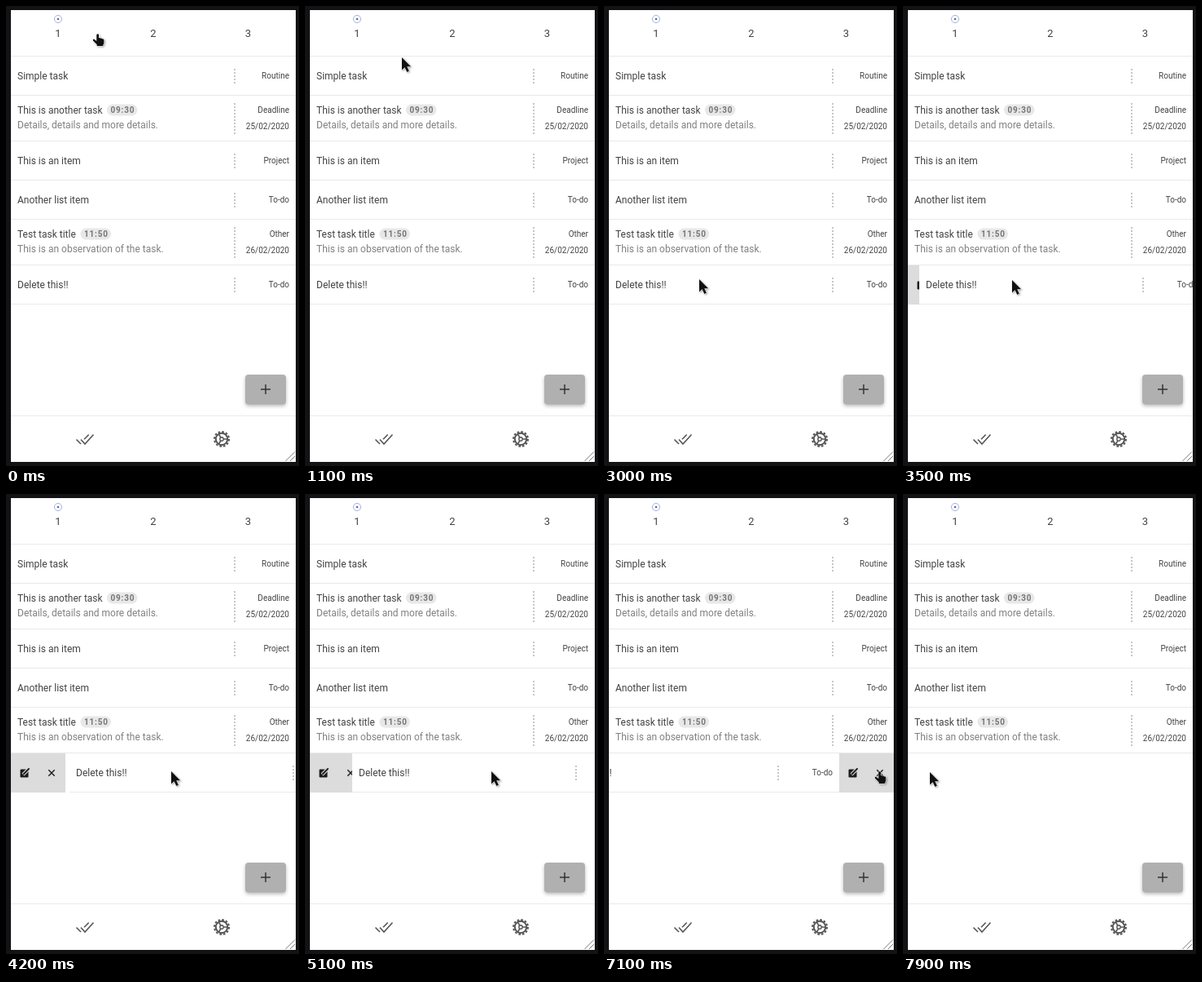
Recreate the animation shown at these times as an HTML page. Size 360x564 px, loop 8 s.

```html
<!DOCTYPE html>
<html lang="en">
<head>
<meta charset="utf-8">
<title>Task list</title>
<style>
html, body { margin: 0; width: 100%; height: 100%; overflow: hidden; background: #131215; }
svg { display: block; width: 360px; height: 564px; }
text { font: 12px Roboto, sans-serif; fill: #434343; }
.tab { font-size: 13px; text-anchor: middle; }
.detail { fill: #808080; }
.side { font-size: 10px; text-anchor: end; }
.time { font-size: 10px; font-weight: 700; letter-spacing: .8px; fill: #757575; }
.pill { fill: #e8e8e8; }
.rule { fill: #e9e9e9; }
.dots { stroke: #c6c6c6; stroke-width: 2; stroke-dasharray: 2 2; }
.icon { fill: none; stroke: #555; stroke-width: 1.6; }
.pointer { fill: #111; stroke: #fff; stroke-width: 1; paint-order: stroke; filter: drop-shadow(1px 1px 1px rgba(0,0,0,.35)); }
.fab { fill: #b0b0b0; filter: drop-shadow(0 2px 2px rgba(0,0,0,.28)); }
</style>
</head>
<body>
<svg viewBox="0 0 360 564">
  <defs>
    <clipPath id="page"><rect x="6" y="5" width="350" height="554"/></clipPath>
    <g id="actions">
      <rect width="67" height="48" fill="#dcdcdc"/>
      <rect x="11.5" y="19.5" width="10" height="10" rx="1.2" fill="#1c1c1c"/>
      <path d="M15 26L23 18" stroke="#dcdcdc" stroke-width="4"/>
      <path d="M15.3 25.7L22.6 18.4" stroke="#1c1c1c" stroke-width="2"/>
      <path d="M46.3 20.3l7.4 7.4m0-7.4l-7.4 7.4" stroke="#222" stroke-width="1.5"/>
    </g>
  </defs>
  <rect x="6" y="5" width="350" height="554" fill="#fff"/>
  <circle cx="64" cy="16" r="4.6" fill="#fff" stroke="#a9b2d8"/>
  <circle cx="64" cy="16" r="1.3" fill="#5068bd"/>
  <text class="tab" x="64" y="38">1</text>
  <text class="tab" x="181" y="38">2</text>
  <text class="tab" x="297.5" y="38">3</text>
  <rect class="rule" x="6" y="61" width="350" height="1"/>
  <g id="list" clip-path="url(#page)"></g>

  <rect class="fab" x="294" y="452" width="50" height="36.5" rx="4"/>
  <path d="M313 470h12m-6-6v12" stroke="#333" stroke-width="1.5"/>

  <rect class="rule" x="6" y="502" width="350" height="1"/>
  <path class="icon" d="M86.5 531.5l5.5 5.5M92 531.5l5 5.5 10.5-11.5M96 531.3l5.7-5.8"/>
  <g class="icon" transform="translate(265 531)">
    <circle r="9" stroke-width="2" stroke-dasharray="2.6 2.112"/>
    <circle r="7.2" stroke-width="2"/>
    <circle r="2.2" stroke-width="1.4"/>
    <path d="M2.2 0H7M-1.1-1.9L-3.5-6M-1.1 1.9L-3.5 6"/>
  </g>
  <path d="M343.5 558L355 546.5M349 558l6-6" stroke="#777"/>

  <g id="cursor">
    <path id="arrow" class="pointer" d="M0 0V15.5L3.6 12.2 6.3 18 8.9 16.8 6.3 11.2H11.2Z"/>
    <path id="hand" class="pointer" d="M-.7 0Q.7-1.4 2 0V4.2Q3.2 3.5 4.2 4.8 5.7 4 6.3 5.4 8.2 4.8 8.4 6.8V10Q8.2 11.5 7.3 12.6V14H-.3V12.3L-5 7.6Q-5.8 5.8-4 5.6L-.7 7.9Z"/>
  </g>
</svg>
<script>
const LOOP = 8000, STEP = 100, REMOVED = 7400;
const $ = id => document.getElementById(id);

const rows = [
  { y: 62, title: 'Simple task', kind: 'Routine' },
  { y: 110, title: 'This is another task', kind: 'Deadline', time: '09:30', pillX: 124,
    detail: 'Details, details and more details.', date: '25/02/2020' },
  { y: 166, title: 'This is an item', kind: 'Project' },
  { y: 214, title: 'Another list item', kind: 'To-do' },
  { y: 262, title: 'Test task title', kind: 'Other', time: '11:50', pillX: 91.5,
    detail: 'This is an observation of the task.', date: '26/02/2020' },
  { y: 318, title: 'Delete this!!', kind: 'To-do', slides: true }
];

const label = (cls, x, y, s) => `<text class="${cls}" x="${x}" y="${y}">${s}</text>`;

function rowMarkup(r) {
  const h = r.detail ? 56 : 48;
  const base = r.detail ? 22 : 28;
  let s = `<rect x="6" width="350" height="${h}" fill="#fff"/>
    <rect class="rule" x="6" y="${h - 1}" width="350" height="1"/>
    <path class="dots" d="M281 ${r.detail ? 9 : 15}V${h - (r.detail ? 9 : 15)}"/>`;
  s += label('', 14, base, r.title) + label('side', 348, base - 1, r.kind);
  if (r.detail) {
    s += `<rect class="pill" x="${r.pillX}" y="10.5" width="37.5" height="14" rx="7"/>`;
    s += label('time', r.pillX + 4.5, 21, r.time);
    s += label('detail', 14, 40, r.detail) + label('side', 348, 41, r.date);
  }
  const body = r.slides ? `<g id="slide">${s}</g>` : s;
  const under = r.slides
    ? '<use id="left" href="#actions" x="6"/><use id="right" href="#actions" x="289"/>' : '';
  return `<g ${r.slides ? 'id="last"' : ''} transform="translate(0 ${r.y})">${under}${body}</g>`;
}
$('list').innerHTML = rows.map(rowMarkup).join('');

// time, x, y of the pointer
const path = [
  [0, 112, 35], [900, 112, 35], [1800, 171, 257], [2200, 171, 257], [2900, 117, 335],
  [3300, 117, 335], [4000, 203, 340], [4400, 203, 340], [4850, 255, 340], [5100, 229, 340],
  [5400, 208, 340], [5600, 208, 339], [6300, 126, 337], [6500, 126, 337], [7100, 338, 341],
  [7350, 338, 341], [7900, 33, 341]
];
// time, shift of the swiped row
const swipe = [
  [0, 0], [3300, 0], [4000, 72], [4400, 72], [4600, 67], [4900, 67], [5100, 52],
  [5400, 30], [5600, 0], [5700, 0], [6300, -70], [6500, -70], [6700, -67]
];

function sample(keys, t) {
  const i = keys.findIndex(k => k[0] > t);
  if (i < 0) return keys[keys.length - 1].slice(1);
  const a = keys[i - 1], b = keys[i];
  const u = (t - a[0]) / (b[0] - a[0]);
  const e = u * u * (3 - 2 * u);
  return a.slice(1).map((v, n) => v + (b[n + 1] - v) * e);
}

const show = (id, on) => $(id).setAttribute('visibility', on ? 'visible' : 'hidden');

function draw(t) {
  const [x, y] = sample(path, t);
  const [dx] = sample(swipe, t);
  const gone = t >= REMOVED;
  const hand = y < 61 || (!gone && dx < -60 && x > 289);
  $('cursor').setAttribute('transform', `translate(${Math.round(x)} ${Math.round(y)})`);
  show('arrow', !hand);
  show('hand', hand);
  $('slide').setAttribute('transform', `translate(${Math.round(dx)} 0)`);
  show('left', !gone && dx > 0);
  show('right', !gone && dx < 0);
  show('last', !gone);
}

const start = performance.now();
function tick() {
  const t = (performance.now() - start) % LOOP;
  draw(Math.floor(t / STEP) * STEP);
  requestAnimationFrame(tick);
}
tick();
</script>
</body>
</html>
```
